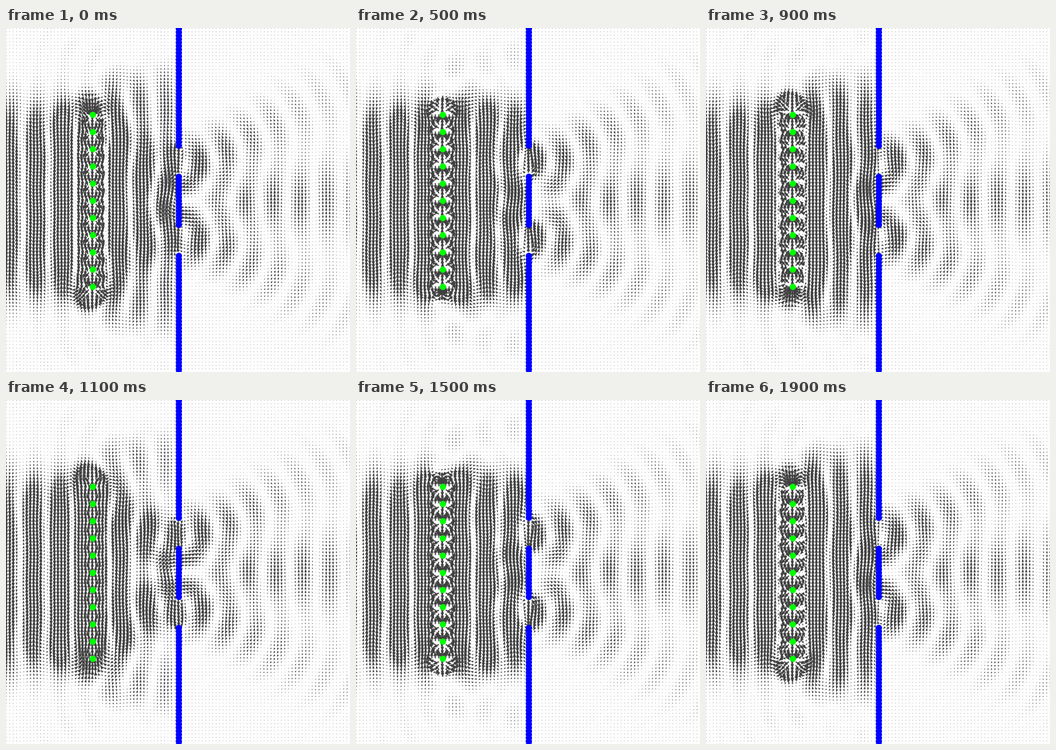
These frames come from a looping animation (600x600 px, 2000 ms). A matplotlib script:

```python
import numpy as np
import matplotlib.pyplot as plt
from matplotlib.animation import FuncAnimation

SIZE, STEP = 600, 6
FRAMES, INTERVAL = 20, 100
K = 2 * np.pi / 90            # wave number, wavelength of 90 px
PHASE = np.radians(118)
WALL_X, SOURCE_X = 300, 150
MAX_LEN, GAIN = 12, 16
SLIT_GAIN = 1.35 * np.exp(1j * np.radians(12))
LEAK = 0.45                   # share of the beam that reappears far behind the wall
DARK, BACK = "#404040", "#fdfdfd"

source_y = np.arange(150, 451, 30)
wall_y = np.arange(0, 601, STEP)
wall_y = wall_y[~(((wall_y > 204) & (wall_y < 258)) | ((wall_y > 342) & (wall_y < 396)))]
slit_y = np.concatenate([np.arange(206.25, 256.5, 1.5), np.arange(344.25, 394.5, 1.5)])


def dipole_row(x, y, x0):
    """Complex field of a row of upright oscillating dipoles at x0."""
    ex = np.zeros(np.shape(x), complex)
    ey = np.zeros(np.shape(x), complex)
    for y0 in source_y:
        r = np.maximum(np.hypot(x - x0, y - y0), 1.5)
        nx, ny = (x - x0) / r, (y - y0) / r
        wave = np.exp(1j * K * r)
        near = (1 / r**3 - 1j * K / r**2) * wave / (1 + (7 / r)**3)
        far = K**2 / r * wave
        ex += nx * ny * (3 * near - far)
        ey += (3 * ny**2 - 1) * near + (1 - ny**2) * far
    return ex, ey


def hankel1(z):
    """First-order outgoing Hankel function from its integral form."""
    v = np.linspace(0, 6, 500)
    z = z[:, None]
    integral = np.sum(2 * v**2 * np.exp(-v**2) * np.sqrt(1 + 0.5j * v**2 / z), axis=1) * v[1]
    z = z[:, 0]
    return np.sqrt(2 / (np.pi * z)) * np.exp(1j * (z - 0.75 * np.pi)) * integral * 2 / np.sqrt(np.pi)


def slit_waves(x, y, strength):
    """Waves spreading from the openings to both sides of the wall."""
    radii = np.linspace(1, 900, 3600)
    table = hankel1(K * radii) / np.sqrt(1 + radii / 35)
    side = np.where(x < WALL_X, -1, 1)
    ex = np.zeros(x.shape, complex)
    ey = np.zeros(x.shape, complex)
    for y0, s in zip(slit_y, strength):
        dx, dy = x - WALL_X, y - y0
        r = np.maximum(np.hypot(dx, dy), 1)
        h = 0.5j * K * 1.5 * s * np.interp(r, radii, table) / r
        ex -= side * h * dy
        ey += h * np.abs(dx)
    return ex, ey


def total_field(x, y):
    ix, iy = dipole_row(x, y, SOURCE_X)
    mx, my = dipole_row(x, y, 2 * WALL_X - SOURCE_X)
    strength = dipole_row(np.full(slit_y.shape, float(WALL_X)), slit_y, SOURCE_X)[1]
    sx, sy = slit_waves(x, y, SLIT_GAIN * strength)
    left = x < WALL_X
    leak = LEAK * (1 - np.exp(-np.maximum(x - WALL_X, 0) / 110))
    ex = np.where(left, ix - mx, leak * ix) + sx
    ey = np.where(left, iy - my, leak * iy) + sy
    # the wall column carries the incoming wave in the openings only
    on_wall = x == WALL_X
    passed = SLIT_GAIN * ~np.isin(y, wall_y)
    ex = np.where(on_wall, ix * passed, ex)
    ey = np.where(on_wall, iy * passed, ey)
    unit = abs(dipole_row(np.array([100.0]), np.array([300.0]), SOURCE_X)[1][0])
    return GAIN * ex / unit, GAIN * ey / unit


axis = np.arange(0, SIZE + 1, STEP, dtype=float)
X, Y = np.meshgrid(axis, axis)
EX, EY = total_field(X, Y)


def arrows(i):
    turn = np.exp(1j * (PHASE - 2 * np.pi * i / FRAMES))
    u, v = (EX * turn).real, (EY * turn).real
    length = np.hypot(u, v) + 1e-9
    fit = np.minimum(1, MAX_LEN / length)
    return u * fit, v * fit


fig = plt.figure(figsize=(6, 6), dpi=100, facecolor=BACK)
ax = fig.add_axes([0, 0, 1, 1])
ax.set_xlim(-0.5, SIZE - 0.5)
ax.set_ylim(0.5, SIZE + 0.5)
ax.axis("off")

quiver = ax.quiver(X, Y, *arrows(0), color=DARK, pivot="tail", angles="uv",
                   units="xy", scale_units="xy", scale=1, width=2,
                   headwidth=2.9, headlength=4, headaxislength=4, minlength=0.45)


def dots(x, ys, color):
    ax.plot(np.full(len(ys), x), ys, "o", color=color, ms=11 * 0.72, mew=0, zorder=3)


dots(WALL_X, wall_y, "#0000ff")
dots(SOURCE_X, source_y, "#00ff00")


def update(i):
    quiver.set_UVC(*arrows(i))
    return (quiver,)


anim = FuncAnimation(fig, update, frames=FRAMES, interval=INTERVAL, repeat=True, repeat_delay=0)
plt.show()
```
